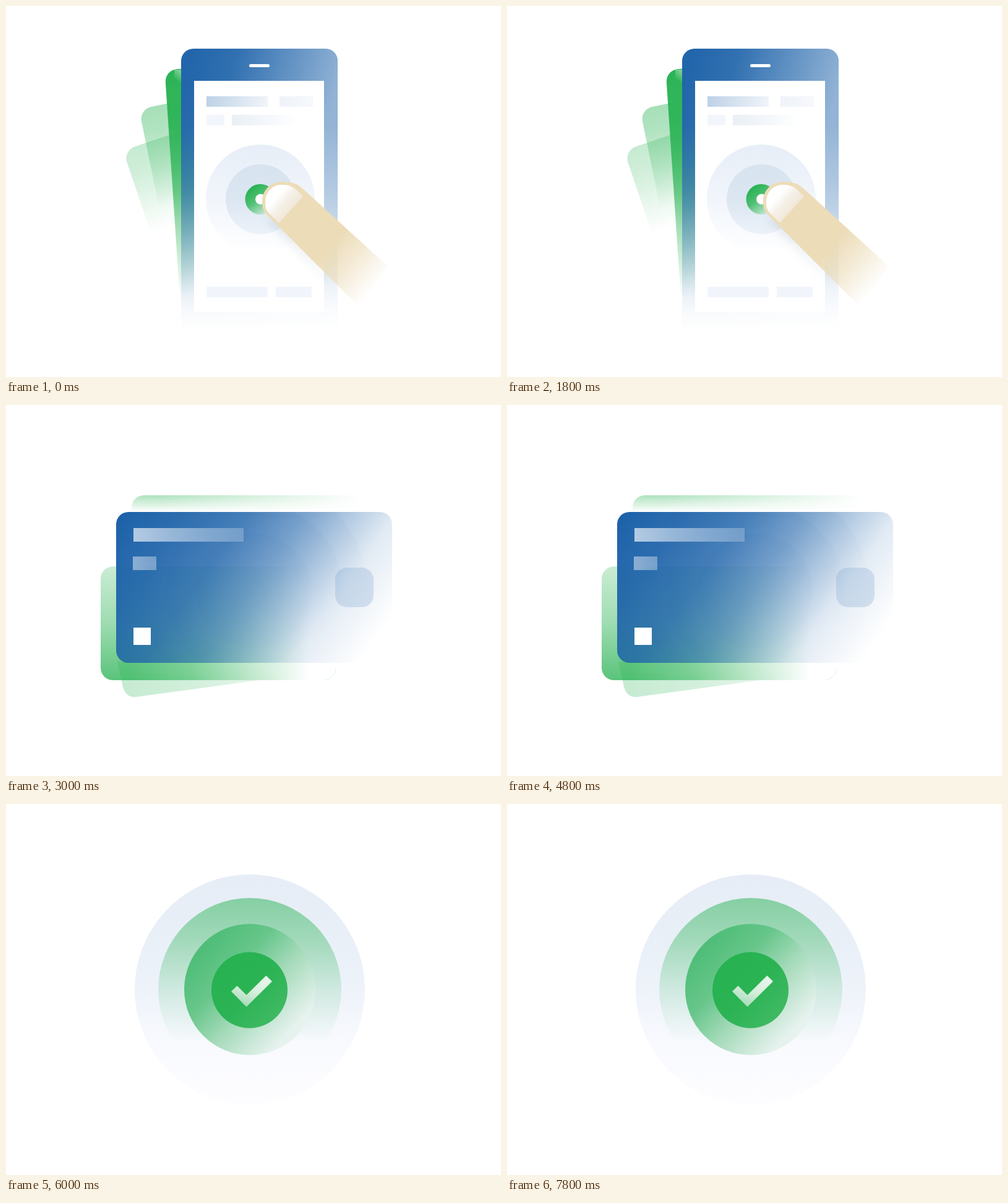
Animation, 800 px wide and 600 px high, one loop 9000 ms. Source, as an HTML page with a canvas:

```html
<!DOCTYPE html>
<html lang="en">
<head>
<meta charset="utf-8">
<title>Tap, pay, done</title>
<style>
  html, body { margin: 0; width: 100%; height: 100%; overflow: hidden; background: #fff; }
  canvas { display: block; }
</style>
</head>
<body>
<canvas id="stage" width="800" height="600"></canvas>
<script>
const ctx = document.getElementById('stage').getContext('2d');
const SCENE_MS = 3000;

const alpha = (hex, a) => hex + Math.round(a * 255).toString(16).padStart(2, '0');
const green = a => alpha('#2bb355', a);
const blue = a => alpha('#1a60a8', a);
const white = a => alpha('#ffffff', a);

function box(x, y, w, h, r = 0) {
  const path = new Path2D();
  path.roundRect(x, y, w, h, r);
  return path;
}

function disc(x, y, r) {
  const path = new Path2D();
  path.arc(x, y, r, 0, Math.PI * 2);
  return path;
}

function tilted(x, y, degrees, w, h) {
  const path = new Path2D();
  path.addPath(box(0, 0, w, h, 20), new DOMMatrix().translate(x, y).rotate(degrees));
  return path;
}

// Fills with a flat colour, or with stops {offset: colour} along axis [x1, y1, x2, y2].
function paint(path, fill, axis) {
  if (axis) {
    const gradient = ctx.createLinearGradient(...axis);
    for (const at in fill) gradient.addColorStop(+at, fill[at]);
    fill = gradient;
  }
  ctx.fillStyle = fill;
  ctx.fill(path);
}

function phone() {
  paint(tilted(215, 167, -11.5, 200, 240), { 0: green(.42), .25: green(.37), 1: green(0) }, [235, 160, 268, 322]);
  paint(tilted(189, 234, -18.8, 200, 200), { 0: green(.27), .3: green(.22), 1: green(0) }, [220, 222, 266, 357]);
  paint(tilted(256.5, 103.3, -3.8, 240, 400),
    { 0: green(1), .25: green(.94), .55: green(.66), .8: green(.28), 1: green(0) }, [258, 102, 282, 470]);
  paint(box(272, 103, 11, 50), { 0: white(.45), 1: white(0) }, [283, 103, 272, 118]);

  const body = box(283, 69, 253, 456, [20, 20, 0, 0]);
  paint(body, { 0: blue(1), .28: blue(.98), .5: blue(.7), .72: blue(.34), .84: blue(.15), .93: blue(.045), 1: blue(0) },
    [0, 69, 0, 525]);
  paint(body, { 0: white(.03), .3: white(.1), 1: white(.52) }, [300, 69, 536, 135]);
  paint(box(393, 94, 33, 5, 2.5), '#fff');
  paint(box(304, 121, 210, 374), '#fff');

  paint(box(324, 146, 99, 17), { 0: '#bdd1e6', 1: '#f1f5fa' }, [324, 146, 423, 163]);
  paint(box(442, 146, 54, 17), { 0: '#eff3f9', 1: '#f6f8fc' }, [442, 0, 496, 0]);
  paint(box(324, 176, 29, 17), '#f2f6fc');
  paint(box(365, 176, 101, 17), { 0: '#e9eff5', 1: '#fdfeff' }, [365, 0, 466, 0]);
  paint(box(324, 454, 99, 17), '#f1f5fb');
  paint(box(436, 454, 58, 17), '#f1f5fb');

  paint(disc(411, 312, 88), { 0: '#e7eef7', .5: '#f1f5fb', 1: '#ffffff' }, [0, 224, 0, 400]);
  paint(disc(411.5, 312.5, 56.5), { 0: '#d7e3ef', .5: '#dbe6f1', 1: '#edf2f9' }, [0, 256, 0, 369]);
  paint(disc(411, 312.5, 24.5), { 0: '#2bb355', .4: '#50bf75', 1: '#d5ecdf' }, [396, 296, 426, 334]);
  paint(disc(411.5, 312.5, 8.5), '#fff');

  finger();
}

function finger() {
  const fade = [512, 382, 596, 456];
  const skin = new Path2D('M425 341 L578 494 L616 420 L478 294 C469 286 458 284 446 284 C428 284 414 298 414 316 C414 328 417 334 425 341Z');
  const nail = new Path2D('M441 351 L428 338 C421 332 419 326 419 318 C419 301 430 289 446 289 C456 289 464 292 470 298 L480 308Z');
  ctx.save();
  ctx.filter = 'blur(7px)';
  paint(new Path2D('M420 345 L442 344 L545 448 L530 460Z'), { 0: '#7088a02a', 1: '#7088a000' }, [440, 360, 540, 460]);
  ctx.restore();
  paint(skin, { 0: '#ecdcb8', .12: '#ecdcb8', .5: '#ecdcb899', 1: '#ecdcb800' }, fade);
  paint(nail, { 0: '#ffffff', .35: '#ffffff', .6: '#f5f0e8', 1: '#efe6d5' }, [424, 296, 465, 331]);
}

function bankCard() {
  const top = box(203, 146, 380, 27, [20, 0, 0, 0]);
  paint(top, { 0: green(.38), 1: green(0) }, [0, 146, 0, 173]);
  paint(top, { 0: white(0), 1: white(1) }, [250, 0, 575, 0]);

  paint(new Path2D('M180 415 L189 456 Q194 474 211 472 L520 430 L500 415Z'),
    { 0: green(.27), .4: green(.2), 1: green(0) }, [190, 0, 515, 0]);
  const side = box(153, 261, 380, 184, 20);
  paint(side, { 0: green(.25), .5: green(.46), 1: green(.78) }, [0, 261, 0, 445]);
  paint(side, { 0: white(0), .35: white(.22), 1: white(1) }, [200, 0, 490, 0]);

  const card = box(178, 173, 446, 244, 20);
  paint(card, { 0: blue(1), .2: blue(.91), .38: blue(.78), .55: blue(.55), .68: blue(.32), .8: blue(.13), 1: blue(0) },
    [178, 173, 551, 444]);
  ctx.save();
  ctx.clip(card);
  for (const r of [184, 143.5, 93.5])
    paint(disc(400.5, 301, r), { 0: blue(.06), 1: blue(0) }, [330, 200, 480, 400]);
  ctx.restore();

  paint(box(206, 199, 178, 22), { 0: white(.66), 1: white(.22) }, [206, 0, 384, 0]);
  paint(box(205, 245, 38, 22), { 0: white(.46), 1: white(.34) }, [205, 0, 243, 0]);
  paint(box(532, 263, 62, 64, 19), { 0: blue(.13), 1: blue(.16) }, [532, 263, 594, 327]);
  paint(box(206, 360, 28, 28), '#fff');
}

function success() {
  paint(disc(394, 300, 186), { 0: '#e7edf6', .25: '#e8eff7', .5: '#eef3fa', .75: '#f9fafe', 1: '#fdfdff' }, [0, 114, 0, 486]);
  paint(disc(394, 300, 148), { 0: green(.52), .3: green(.37), .65: green(.15), 1: green(0) }, [0, 152, 0, 385]);
  paint(disc(394, 300, 106), { 0: '#50be79', .3: '#68c68b', .6: '#a4dab9', 1: '#e6f2ee' }, [315, 240, 456, 372]);
  paint(disc(393.5, 301, 61.5), { 0: '#27b251', .5: '#2bb354', 1: '#3fb963' }, [350, 258, 437, 344]);
  paint(new Path2D('M364 303 L373.5 294 L388.5 309 L420.5 277.5 L430 287 L388.5 328Z'),
    { 0: '#e6f5ea', .45: '#d6efdd', 1: '#a6dbb8' }, [405, 280, 388, 328]);
}

const scenes = [phone, bankCard, success];
let shown = -1;

function frame() {
  const index = Math.floor(performance.now() / SCENE_MS) % scenes.length;
  if (index !== shown) {
    shown = index;
    paint(box(0, 0, 800, 600), '#fff');
    scenes[index]();
  }
  requestAnimationFrame(frame);
}
frame();
</script>
</body>
</html>
```
